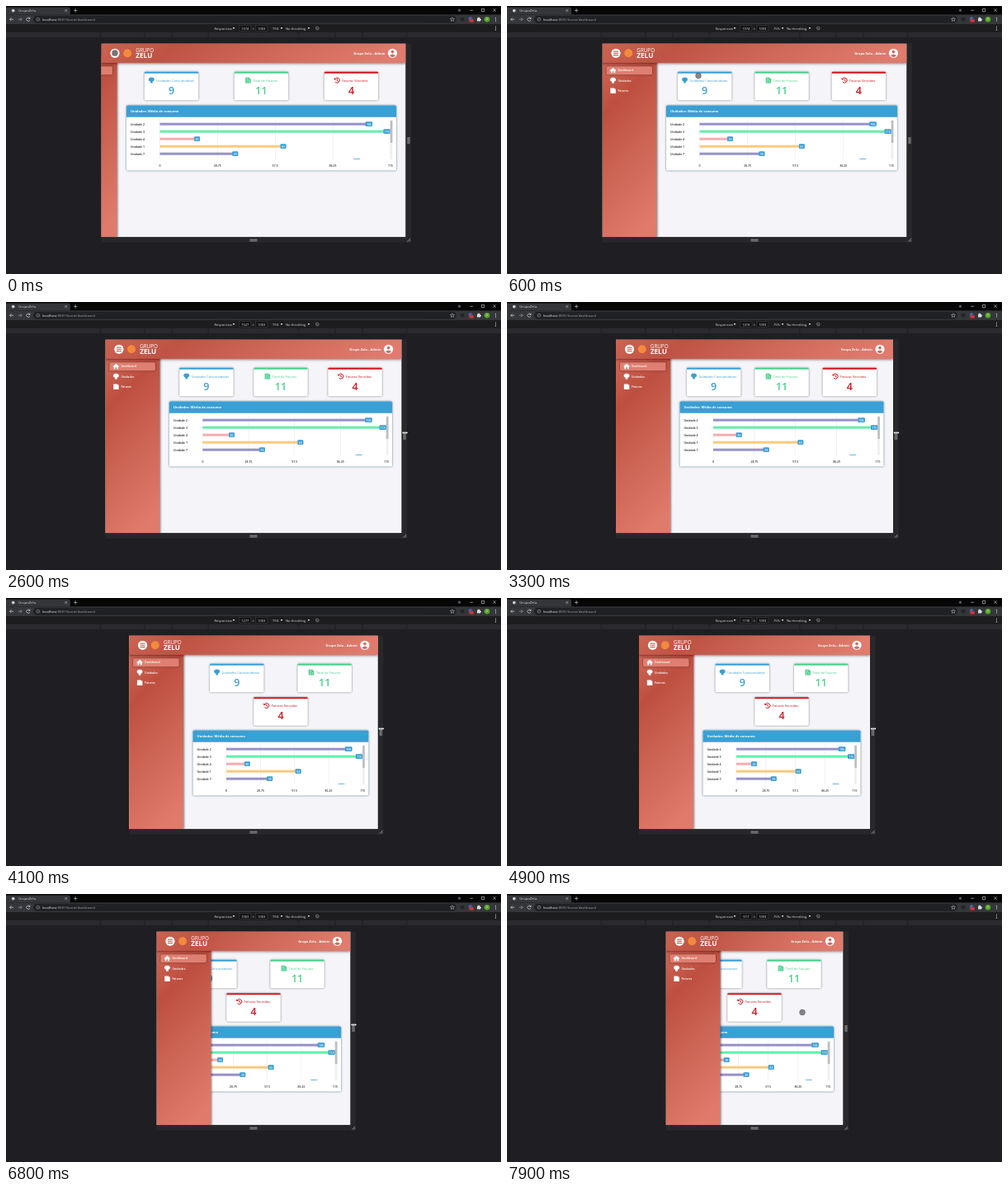
Animation, 600 px wide and 325 px high, one loop 8 s. Source, as an HTML page:

```html
<!DOCTYPE html>
<html lang="pt">
<head>
<meta charset="utf-8">
<title>Dashboard</title>
<style>
  html, body { margin: 0; width: 100%; height: 100%; overflow: hidden; background: #1f1e22; }
  svg { display: block; width: 100vw; height: 100vh; }
  text { font-family: "Open Sans", "Noto Sans", sans-serif; white-space: pre; }
  .card { filter: drop-shadow(0 .7px .9px rgba(0, 0, 0, .5)); }
  .panel { filter: drop-shadow(0 .5px 1px rgba(20, 70, 100, .75)); }
  .bar { filter: drop-shadow(0 1px 1.4px rgba(0, 0, 0, .5)); }
  .drawer { filter: drop-shadow(1px 0 1.2px rgba(0, 0, 0, .45)); }
</style>
</head>
<body>
<svg viewBox="0 0 600 325" preserveAspectRatio="none">
  <defs>
    <linearGradient id="headerFill" x1="0" y1="0" x2="1" y2=".08">
      <stop offset="0" stop-color="#cb6353"/><stop offset=".25" stop-color="#bf5344"/>
      <stop offset=".6" stop-color="#cf6858"/><stop offset="1" stop-color="#e07b6d"/>
    </linearGradient>
    <linearGradient id="drawerFill" x1=".3" y1="0" x2=".6" y2="1">
      <stop offset="0" stop-color="#cb6252"/><stop offset=".22" stop-color="#be4f40"/>
      <stop offset=".55" stop-color="#cc6353"/><stop offset="1" stop-color="#e07a6b"/>
    </linearGradient>
    <g id="bulb" fill="currentColor">
      <path d="M-3.5 -.6A3.5 3 0 0 1 3.5 -.6Q3.4 1 1.4 1.4L1.2 3.4H-1.2L-1.4 1.4Q-3.4 1 -3.5 -.6Z"/>
    </g>
    <g id="bill">
      <path fill="currentColor" d="M-3.2 -3.3H1.8V-2.2H3.3V3.4H-3.2Z"/>
      <path d="M-2 -1.6H.6M-2 .2H-.4M-2 1.9H-.4M1.2 -.3V2.2" stroke="#fff" stroke-width=".7" opacity=".8"/>
    </g>
    <g id="history" fill="none" stroke="currentColor">
      <path d="M-2.5 -1.7A3 3 0 1 1 -2.3 2M0 -1.7V.3L1.4 1" stroke-width="1"/>
      <path d="M-3.6 -3.2V-.5H-.9Z" fill="currentColor" stroke="none"/>
    </g>
    <path id="home" fill="currentColor" d="M-3.8 .1L0 -3.3L3.8 .1L3.2 .7L2.7 .3V3.2H.8V1H-.8V3.2H-2.7V.3L-3.2 .7Z"/>
    <clipPath id="viewClip"><rect id="viewBox" y="45.5" height="234.7"/></clipPath>
    <clipPath id="rowsClip"><rect y="137" width="600" height="49"/></clipPath>
  </defs>
  <g id="browser"></g>
  <g id="stage"></g>
</svg>
<script>
const LOOP = 8000, STEP = 100;
const SCALE = 369 / 1574, MID = 300;
const TOP = 45.5, BOTTOM = 280.2, DRAWER = 66, MARGIN = 11.5, CARD = 65.5;
const BLUE = '#3a9fd3', GREEN = '#4bd08f', RED = '#d0141c';

const EDGE = [[1800, 484.5], [2700, 479], [3300, 468], [3400, 466.2], [3600, 457], [4500, 446],
  [4900, 440], [5000, 439.5], [5400, 433], [5700, 431], [5800, 427.8], [6800, 417.57],
  [6900, 417.57], [7200, 409.5], [7400, 407.5]];
const POINTER_IN = [[0, 132, 57], [300, 134, 59], [900, 330, 110], [1300, 493, 150],
  [1600, 491, 153.5], [1800, 488.5, 158.5]];
const POINTER_OUT = [[7400, 411.5, 158.5], [7800, 358, 143.5]];

const CARDS = [
  ['Unidades Consumidoras', '9', BLUE, 'bulb', 46],
  ['Total de Faturas', '11', GREEN, 'bill', 30],
  ['Faturas Vencidas', '4', RED, 'history', 32]];
const ROWS = [['2', 106, '#9791cb'], ['3', 115, '#62efac'], ['4', 20, '#f6adb0'],
  ['1', 63, '#fdca7d'], ['7', 39, '#9791cb'], ['5', 100, '#62efac']];
const MENU = [['home', 'Dashboard', 78], ['bulb', 'Unidades', 90.3], ['bill', 'Faturas', 102.7]];

function track(keys, t, i = 1) {
  if (t <= keys[0][0]) return keys[0][i];
  for (let k = 1; k < keys.length; k++) {
    const a = keys[k - 1], b = keys[k];
    if (t <= b[0]) return a[i] + (b[i] - a[i]) * (t - a[0]) / (b[0] - a[0]);
  }
  return keys[keys.length - 1][i];
}

const rect = (x, y, w, h, fill, more = '') =>
  `<rect x="${x}" y="${y}" width="${w}" height="${h}" fill="${fill}" ${more}/>`;
const disc = (x, y, r, fill, more = '') => `<circle cx="${x}" cy="${y}" r="${r}" fill="${fill}" ${more}/>`;
const line = (d, color, width = .7) =>
  `<path d="${d}" fill="none" stroke="${color}" stroke-width="${width}"/>`;
const text = (x, y, s, size, fill, weight = 400, anchor = 'start') =>
  `<text x="${x}" y="${y}" font-size="${size}" fill="${fill}" font-weight="${weight}" text-anchor="${anchor}">${s}</text>`;
const icon = (id, x, y, color, scale = 1) =>
  `<use href="#${id}" transform="translate(${x} ${y}) scale(${scale})" color="${color}"/>`;
const arrowDown = (x, y) => `<path d="M${x - 1.3} ${y - 1}h2.6l-1.3 2.2Z" fill="#d5d6d8"/>`;
const dots = (x, y) => [-1.9, 0, 1.9].map(d => disc(x, y + d, .6, '#d0d2d5')).join('');

function browser() {
  const ink = '#d8dadd', dim = '#9aa0a6';
  const ticks = [425, 768, 1024, 1440].flatMap(w => [MID - w * .129, MID + w * .129]);
  return rect(0, 0, 600, 10.5, '#060607')
    + '<path d="M0 10.5V1.5H75.5Q78 1.5 78 4V10.5Z" fill="#35363a"/>'
    + disc(8.7, 5.6, 1.9, '#c9cacc')
    + text(15, 7.2, 'GrupoZelu', 4.3, ink)
    + line('M71.4 4.2l2.6 2.6m0 -2.6l-2.6 2.6M82 5.4h4.4m-2.2 -2.2v4.4', ink, .6)
    + disc(549.5, 5.2, 1.7, '#55575b')
    + line('M562.3 5.3h3.6M576.5 3.5h3.2v3.2h-3.2ZM590.4 3.4l3.4 3.4m0 -3.4l-3.4 3.4', ink, .6)
    + rect(0, 10.5, 600, 11.5, '#35363a')
    + rect(33, 11.8, 513, 9, '#202124', 'rx="4.5"')
    + line('M9 16.2H4.6m2 -2l-2 2l2 2', ink)
    + line('M14.8 16.2h4.4m-2 -2l2 2l-2 2', dim)
    + line('M28.7 15.1A2.1 2.1 0 1 0 28.9 17M29 13.6v1.8h-1.8', ink)
    + disc(38.8, 16.2, 1.9, 'none', `stroke="${dim}" stroke-width=".6"`)
    + line('M38.8 15.8v1.4M38.8 14.9v.4', dim, .5)
    + text(44, 17.9, `localhost<tspan fill="${dim}">:8081/home/dashboard</tspan>`, 4.2, '#e8eaed')
    + '<path d="M541 13.7l.7 1.7l1.8 .1l-1.4 1.2l.5 1.8l-1.6 -1l-1.6 1l.5 -1.8l-1.4 -1.2l1.8 -.1Z" fill="none" stroke="#c9cbce" stroke-width=".5"/>'
    + disc(553, 16.2, 2.5, '#232429') + disc(563, 15.4, 2.4, '#4b5f92')
    + rect(561.5, 16.2, 5.4, 3.2, '#d93040', 'rx=".8"')
    + rect(571, 14.6, 4, 4, ink, 'rx=".6"') + disc(573, 14.4, .9, ink) + disc(575.2, 16.6, .9, ink)
    + disc(583, 16.2, 3.3, '#56a829') + text(583, 17.4, 'G', 3.4, '#dff0d2', 400, 'middle')
    + dots(593.5, 16.2)
    + rect(0, 22, 600, 10, '#1d1d20')
    + text(252.5, 28.5, 'Responsive', 4.1, ink) + arrowDown(276, 27)
    + rect(282.5, 23.7, 14.5, 6.6, '#151518', 'stroke="#46474b" stroke-width=".4"')
    + text(299.8, 28.5, '×', 4.2, ink, 400, 'middle')
    + rect(302.5, 23.7, 14.5, 6.6, '#151518', 'stroke="#46474b" stroke-width=".4"')
    + text(309.8, 28.5, '1003', 4, ink, 400, 'middle')
    + text(323, 28.5, '75%', 4, ink) + arrowDown(334, 27)
    + text(339, 28.5, 'No throttling', 4.1, ink) + arrowDown(367, 27)
    + disc(377.3, 27, 1.8, 'none', `stroke="${dim}" stroke-width=".6"`) + line('M376 25.7l2.6 2.6', dim, .5)
    + dots(593.5, 27)
    + rect(0, 32, 600, 6, '#2b2b2f')
    + ticks.map(x => rect(x - .4, 32, .8, 6, '#1c1c1f')).join('')
    + rect(0, 38, 600, 287, '#1f1e22');
}

function summaryCard(x, y, [title, value, color, glyph, titleWidth]) {
  const mid = x + CARD / 2, start = mid - (titleWidth + 9.5) / 2;
  return `<g class="card">${rect(x, y, CARD, 34.5, '#fff', 'rx="1.6"')}</g>`
    + `<path d="M${x} ${y + 2}V${y + 1.4}Q${x} ${y} ${x + 1.4} ${y}H${x + CARD - 1.4}Q${x + CARD} ${y} ${x + CARD} ${y + 1.4}V${y + 2}Z" fill="${color}"/>`
    + icon(glyph, start + 3.6, y + 10.3, color)
    + text(start + 9.5, y + 12, title, 4, color)
    + text(mid, y + 26.8, value, 12.5, color, 600, 'middle');
}

function badge(right, y, value) {
  const w = value > 99 ? 8.5 : 7;
  return rect(right - w, y - 2.9, w, 5.8, BLUE, 'rx="1"')
    + text(right - w / 2, y + 1.3, value, 3.5, '#fff', 600, 'middle');
}

function chart(x, right, dy) {
  const x0 = x + 40.5, span = right - 7 - x0, w = right - x;
  const at = v => x0 + span * v / 115;
  const marks = [0, 28.75, 57.5, 86.25, 115];
  const rows = ROWS.map(([name, value, color], i) => {
    const y = 143.2 + 9 * i;
    return text(x + 5, y + 1.4, 'Unidade ' + name, 3.5, '#222', 600)
      + rect(x0, y - 1.5, at(value) - x0, 3, color) + badge(at(value), y, value);
  }).join('');
  return `<g transform="translate(0 ${dy})">
    <g class="panel">${rect(x, 120.6, w, 79, '#fff', 'rx="1.6"')}</g>
    <path d="M${x} 134.8V122.2Q${x} 120.6 ${x + 1.6} 120.6H${right - 1.6}Q${right} 120.6 ${right} 122.2V134.8Z" fill="${BLUE}"/>`
    + text(x + 5, 129.2, 'Unidades: Média de consumo', 4, '#fff', 700)
    + marks.map(v => rect(at(v) - .2, 138, .4, 48, '#dedee2')).join('')
    + `<g clip-path="url(#rowsClip)">${rows}</g>`
    + rect(right - 7.2, 138.5, 2.6, 47.5, '#f0f0f2') + rect(right - 7.2, 139, 2.6, 27, '#bdbdc0')
    + marks.map(v => text(at(v), 194.6, v, 3.5, '#333', 600, 'middle')).join('') + '</g>';
}

function content(from, edge) {
  const left = from + MARGIN, right = edge - MARGIN, width = right - left;
  const wrapped = width < 222;
  const perRow = wrapped ? 2 : 3;
  const pad = (width - perRow * CARD) / (2 * perRow);
  const cards = CARDS.map((card, i) => {
    const below = wrapped && i === 2;
    const x = below ? (left + right - CARD) / 2 : left + pad + i * (CARD + 2 * pad);
    return summaryCard(x, below ? 120.2 : 79.8, card);
  }).join('');
  return cards + chart(left, right, wrapped ? 40 : 0);
}

function drawer(x) {
  return `<g class="drawer">${rect(x, 60, DRAWER, BOTTOM - 60, 'url(#drawerFill)')}</g>`
    + `<g class="card">${rect(x + 5, 73.2, 55.5, 10, '#df7f71', 'rx="1.6"')}</g>`
    + MENU.map(([glyph, label, y]) =>
      icon(glyph, x + 13, y, '#fff') + text(x + 19, y + 1.4, label, 3.5, '#fff', 600)).join('');
}

function header(left, edge) {
  const menu = left + 16.5, user = edge - 16;
  return `<g class="bar">${rect(left, TOP, edge - left, 23.4, 'url(#headerFill)')}</g>`
    + disc(menu, 57.3, 5.6, '#fff') + line(`M${menu - 3} 55.1h6m-6 2.2h6m-6 2.2h6`, '#b9503f', 1)
    + disc(left + 31.7, 57.3, 5, '#f28a3c')
    + text(left + 41.8, 56.2, 'GRUPO', 6.3, '#fff')
    + text(left + 41.8, 63.2, 'ZELU', 8.2, '#fff', 700)
    + text(edge - 25, 58.8, 'Grupo Zelu - Admin', 4, '#fff', 700, 'end')
    + disc(user, 57.3, 5.6, '#fff') + disc(user, 55.6, 1.8, '#cf6a5b')
    + `<path d="M${user - 3.5} 60.6Q${user} 56.2 ${user + 3.5} 60.6Q${user} 63.4 ${user - 3.5} 60.6Z" fill="#cf6a5b"/>`;
}

function frameHandles(left, edge) {
  const grip = '#a5a5a8';
  return rect(left, TOP, edge - left + 6.5, BOTTOM - TOP + 6.5, '#28282b')
    + line(`M${edge + 2.6} 159v8m1.8 -8v8`, grip, .9)
    + line('M295.5 283.2h9m-9 1.8h9', grip, .9)
    + line(`M${edge + 1.8} 285.8l4 -4m-1.8 4l1.8 -1.8`, grip, .8);
}

function pointer(t, edge) {
  let x = edge + 4, y = 158.5;
  if (t < 1800 || t > 7400) {
    const path = t < 1800 ? POINTER_IN : POINTER_OUT;
    x = track(path, t, 1);
    y = track(path, t, 2);
  }
  if (x < edge) return disc(x, y, 3.4, 'rgba(95,95,100,.75)', 'stroke="#55555a" stroke-width=".5"');
  return line(`M${x - 2.6} ${y}h5.2M${x} ${y - 1.4}v2.8`, '#fff', .7)
    + `<path d="M${x - 3.4} ${y}l1.7 -1.4v2.8ZM${x + 3.4} ${y}l-1.7 -1.4v2.8Z" fill="#fff"/>`;
}

const $ = id => document.getElementById(id);

function render(t) {
  const edge = track(EDGE, t), left = 2 * MID - edge;
  const open = DRAWER - 47 * (1 - Math.min(t / 450, 1)) ** 3;
  const overlay = (edge - left) / SCALE < 1024;
  const shownWidth = Math.round(2 * (track(EDGE, t + STEP) - MID) / SCALE);
  $('viewBox').setAttribute('x', left);
  $('viewBox').setAttribute('width', edge - left);
  $('stage').innerHTML = text(289.8, 28.5, Math.min(shownWidth, 1574), 4, '#d8dadd', 400, 'middle')
    + frameHandles(left, edge)
    + `<g clip-path="url(#viewClip)">${rect(left, TOP, edge - left, BOTTOM - TOP, '#f5f4f8')}`
    + content(overlay ? left : left + open, edge)
    + drawer(left + open - DRAWER) + header(left, edge) + '</g>'
    + pointer(t, edge);
}

$('browser').innerHTML = browser();
const begin = performance.now();
let shown = -1;
function tick() {
  const t = Math.floor((performance.now() - begin) % LOOP / STEP) * STEP;
  if (t !== shown) render(shown = t);
  requestAnimationFrame(tick);
}
tick();
</script>
</body>
</html>
```
